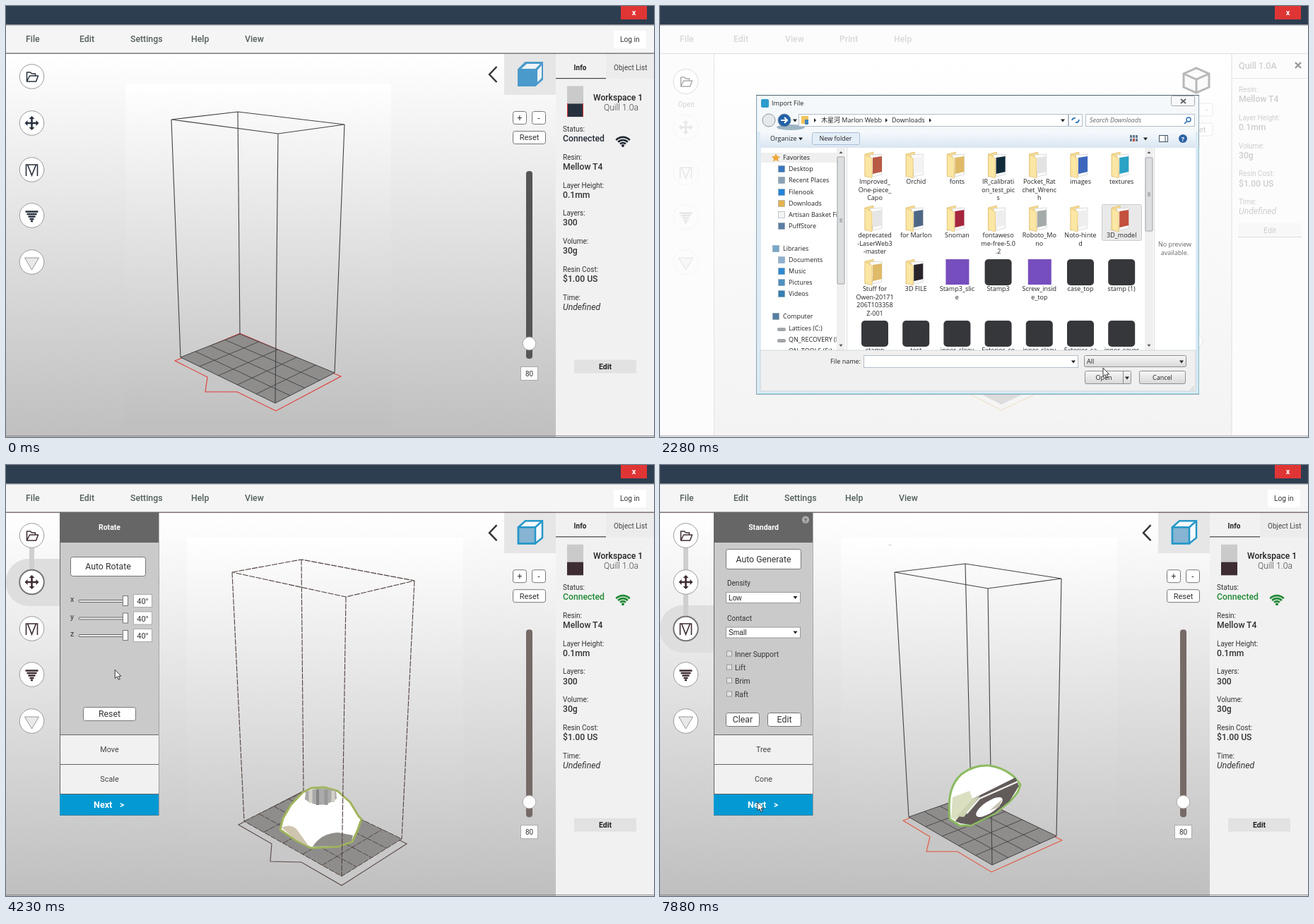
Write an HTML page that moves like this. It is 917 by 611 pixels and loops after 8000 ms.

```html
<!DOCTYPE html>
<html lang="en">
<head>
<meta charset="utf-8">
<title>Print preparation</title>
<style>
html, body { margin: 0; width: 100%; height: 100%; overflow: hidden; background: #fff }
svg { display: block; width: 917px; height: 611px; font-family: Roboto, sans-serif }
.dlg { font-family: "Open Sans", "Noto Sans", "Noto Sans CJK SC", sans-serif }
.form { font-family: "Liberation Sans", Arial, sans-serif }
</style>
</head>
<body>
<svg id="stage" viewBox="0 0 917 611"></svg>
<script>
const rect = (x, y, w, h, fill, more = '') =>
  `<rect x="${x}" y="${y}" width="${w}" height="${h}" fill="${fill}" ${more}/>`;
const text = (x, y, s, size = 10, fill = '#333', more = '') =>
  `<text x="${x}" y="${y}" font-size="${size}" fill="${fill}" ${more}>${s}</text>`;
const path = (d, stroke = '#333', width = 1, fill = 'none', more = '') =>
  `<path d="${d}" stroke="${stroke}" stroke-width="${width}" fill="${fill}" ${more}/>`;
const circle = (x, y, r, fill, stroke = 'none', width = 1) =>
  `<circle cx="${x}" cy="${y}" r="${r}" fill="${fill}" stroke="${stroke}" stroke-width="${width}"/>`;
const group = (s, more) => `<g ${more}>${s}</g>`;
const at = (x, y, s, more = '') => group(s, `transform="translate(${x} ${y})" ${more}`);
const mid = 'text-anchor="middle"', medium = 'font-weight="500"', bold = 'font-weight="700"';
const midBold = `${mid} ${bold}`;
const button = (x, y, w, h, label, size = 12.3) =>
  rect(x + .5, y + .5, w - 1, h - 1, '#fff', 'rx="3" stroke="#777"') +
  text(x + w / 2, y + h / 2 + size * .36, label, size, '#333', mid);
const down = (x, y, r = 3, fill = '#222') => path(`M${x - r} ${y - r / 2}h${2 * r}l${-r} ${r * 1.3}z`, 'none', 0, fill);

// Tool icons, centred on 0,0
const tools = ink => [
  path('M-7 7V-6H-2L0-4H5V-1M-7 7L-3-1H9L6 7Z', ink, 1.5, 'none', 'stroke-linejoin="round"'),
  path('M-7 0H7M0-7V7', ink, 2.6) +
    path('M0-10l4 4h-8zM0 10l4-4h-8zM-10 0l4-4v8zM10 0l-4-4v8z', 'none', 0, ink),
  path('M-8 9V-7H8V9M-6-7L0 8 6-7', ink, 1.6),
  path('M-9-5.500H9M-7-2H7M-5 1.500H5M-3 5H3M-1.500 8H1.500', ink, 2.4),
  path('M-10-6H10L0 11Z', '#999', 1, '#e9e9e9')
];
const toolY = [100, 166, 232, 297, 363];

function toolbar(ink, active) {
  let s = '';
  if (active >= 0) s += rect(0, toolY[active] - 33, 217, 67, '#dedede', 'rx="32"');
  if (active > 0) s += rect(33, 110, 7, toolY[active] - 110, '#cfcfcf');
  tools(ink).forEach((icon, i) => {
    const on = i === active && i;
    s += circle(36.5, toolY[i], 17.3, '#fff', on ? '#777' : '#999', on ? 2 : 1) + at(36.5, toolY[i], icon);
  });
  return s;
}

const titleBar = rect(0, 0, 917, 27, '#2d3e50') + rect(0, 26, 917, 1.5, '#8b9096') +
  rect(870, 0, 37, 19, '#e03535') + text(888.5, 13, 'x', 11, '#fff', midBold);
const menu = (names, xs, fill) => names.map((n, i) => text(xs[i], 50.7, n, 12.3, fill, medium)).join('');

function details(x, y, step, rows, fill, accent = fill) {
  return rows.map(([k, v], i) => {
    const style = v === 'Undefined' ? 'font-style="italic"' : medium;
    return text(x, y + i * step, k + ':', 10, fill) +
      text(x, y + i * step + 14.2, v, 12.2, v === 'Connected' ? accent : fill, style);
  }).join('');
}
const specs = [['Resin', 'Mellow T4'], ['Layer Height', '0.1mm'], ['Layers', 300], ['Volume', '30g'],
  ['Resin Cost', '$1.00 US'], ['Time', 'Undefined']];

const solidCube = path('M725 90L735 80H759V104L749 113H725Z', '#4a9acb', 2, '#4a9acb') +
  path('M729 89L737 82H756L749 89ZM752 91L758 84V102L752 108Z', 'none', 0, '#eef3f6');
const openCube = path('M725 89L735 80H759V104L749 112H725Z', '#2597c9', 2.5, '#f6fafc') +
  path('M725 89H749V112H725ZM749 89L759 80', '#2597c9', 2.5, '#86b4d2');

const controls = track =>
  path('M694.500 86L684 97 694.500 108', '#333', 2.4) +
  button(717, 149, 20, 19, '+', 12) + button(744, 149, 20, 19, '-', 12) + button(717, 177, 47, 19, 'Reset', 11) +
  rect(736, 234, 9, 266, track, 'rx="4"') + circle(740.5, 478.5, 9.3, '#fff', '#aaa') +
  rect(728.5, 511.5, 24, 19, '#fff', 'stroke="#aaa"') + text(740.5, 524.5, 80, 10, '#333', mid);

const infoPanel = (ink, signal, edges) =>
  rect(778, 68, 139, 542, '#f1f1f1') + rect(849, 68, 68, 35, '#ececec') + rect(778, 102, 71, 1.2, '#444') +
  text(812.5, 90.5, 'Info', 10, '#222', midBold) + text(860, 90.5, 'Object List', 10, '#444') +
  rect(794, 113.5, 23, 44, '#cacaca') + rect(794, 138.5, 23, 18.5, ink) + edges +
  text(831, 134, 'Workspace 1', 12.1, '#222', medium) +
  text(895, 148, 'Quill 1.0a', 12.2, '#444', 'text-anchor="end" font-weight="300"') +
  group(details(788, 178, 39.75, [['Status', 'Connected'], ...specs], '#333', signal), 'class="info"') +
  [5.5, 9.5, 13.5].map(r => path(`M${873 - r * .72} ${199.5 - r * .7}A${r} ${r} 0 0 1 ${873 + r * .72} ${199.5 - r * .7}`, signal, 2.6)).join('') +
  circle(873, 198, 2, signal) +
  rect(804, 501.5, 88, 19, '#e2e2e2') + text(848, 514.5, 'Edit', 10.5, '#222', midBold);

const dark = { ink: '#27303d', track: '#555', signal: '#222a33', line: '#666', cube: solidCube, shift: 0,
  edges: path('M794.500 138V157M816.500 138V157', '#d33') };
const brown = { ink: '#3d2c31', track: '#766a67', signal: '#218a37', line: '#6d5d5e', cube: openCube, shift: -.8, edges: '' };

const shell = (look, active, panels, view) =>
  rect(0, 0, 917, 611, '#f5f5f5') + titleBar +
  menu(['File', 'Edit', 'Settings', 'Help', 'View'], [28, 104, 176, 262, 338], '#53605a') +
  rect(860, 35, 46, 25, '#fff') + text(869, 51.2, 'Log in', 10.2) +
  rect(0, 68, 778, 543, 'url(#sky)') +
  panels.map(([x, y, w, h]) => rect(x, y, w, h, 'url(#sky)')).join('') + view + toolbar(look.ink, active) +
  at(0, look.shift, rect(705, 67, 73, 59, '#e6e6e6') + look.cube + controls(look.track) + infoPanel(look.ink, look.signal, look.edges)) +
  rect(0, 66.5, 917, 1.3, look.line) + rect(0, 609, 917, 1, '#888');

// Build volume; corners run left, back, right, front
function volume(top, base, plate, o, model = '') {
  const mix = (a, b, k) => a.map((v, i) => v + (b[i] - v) * k);
  const [l, b, r, f] = base;
  let grid = '';
  for (let i = 1; i < 5; i++) grid += `M${mix(l, f, i / 5)}L${mix(b, r, i / 5)}`;
  for (let i = 1; i < 4; i++) grid += `M${mix(l, b, i / 4)}L${mix(f, r, i / 4)}`;
  const dash = o.dash ? 'stroke-dasharray="8 1.500"' : '';
  const post = i => `M${top[i]}L${base[i]}`;
  return path(`M${plate.join('L')}Z`, o.edge, 1.1, o.fill) +
    path(`M${base.join('L')}Z`, o.line, 1, '#8e8d8c', dash) + path(grid, o.line, .9, 'none', dash) +
    path(post(1), o.line, 1.1, 'none', dash) + (o.over ? '' : model) +
    path(`M${top.join('L')}Z` + post(0) + post(2) + post(3), o.line, 1.1, 'none', dash) + (o.over ? model : '');
}

const dome =
  path('M388 517L392 501 403 482 420 464 432 458 450 457 469 462 487 478 499 498 503 502 497 519 490 534 470 541 432 543 410 532Z',
    '#a0b45b', 3, '#fff', 'stroke-linejoin="round"') +
  path('M424 463Q445 455 467 462L468 473Q445 490 423 474Z', 'none', 0, '#aaa') +
  path('M431 461V479M463 462V478', '#d3d0c8', 5) + path('M441 460V482', '#858585', 4) + path('M453 460V482', '#999', 5) +
  path('M390 514Q402 508 411 516L429 541 410 531Z', 'none', 0, '#cfc4ae') +
  path('M434 541Q446 522 470 521L491 525 489 533 470 540Z', 'none', 0, '#908e89');
const tilted =
  path('M410 502C407 470 412 451 427 438Q444 425 465 426 484 428 500 441L510 453Q508 465 495 477L474 494 440 511H424Z',
    '#8cbb60', 3, '#fff', 'stroke-linejoin="round"') +
  path('M414 471L438 462 443 475 421 505 412 500Z', 'none', 0, '#dadfc2') +
  path('M418 505L443 473 503 443 508 455 495 476 474 493 440 510 425 508Z', 'none', 0, '#625b59') +
  path('M420 498L443 473 453 469 430 499Z', 'none', 0, '#cdd2b2') +
  path('M434 494L452 473 506 449', '#f2f2ef', 2.4) +
  '<ellipse cx="466" cy="485" rx="22" ry="8" transform="rotate(-34 466 485)" fill="#fff"/>' +
  path('M466 490L484 474 480 485Z', 'none', 0, '#c8c4b5');

const emptyView = volume([[234, 161], [328, 150], [479, 168], [385, 181]],
  [[247, 498], [331, 465], [465, 520], [381, 563]],
  [[239, 503], [285, 526], [282, 547], [327, 547], [382, 574], [474, 525], [331, 464]],
  { line: '#424345', edge: '#e23a35', fill: '#c6c6c6' });
const domeView = volume([[320, 152], [418, 134], [578, 164], [481, 187]],
  [[337, 505], [421, 463], [560, 530], [475, 583]],
  [[329, 510], [376, 537], [374, 562], [418, 563], [475, 596], [567, 537], [421, 462]],
  { line: '#50413f', edge: '#5a4a48', fill: '#c8c8c8', dash: true }, dome);
const tiltedView = volume([[332, 152], [432, 140], [568, 161], [464, 175]],
  [[352, 499], [440, 468], [561, 526], [470, 567]],
  [[344, 504], [382, 527], [377, 548], [421, 548], [469, 577], [569, 532], [440, 467]],
  { line: '#454343', edge: '#e4553f', fill: '#c6c6c6', over: true }, tilted) +
  text(323, 114, '..', 9, '#777');

const next = y => rect(76, y, 140, 29.5, '#0499d3') + text(124, y + 19, 'Next', 12.6, '#fff', bold) +
  text(161, y + 19, '&gt;', 12, '#fff', bold);
const importPane = rect(76, 67, 139, 135, '#c9c9c9') + button(92, 86, 107, 28, 'Import') + next(202);

const accordion = (title, a, b, body) => rect(76, 67, 140.5, 430, '#666') +
  text(146.5, 91.5, title, 10.5, '#fff', midBold) + rect(77, 110, 139, 272, '#cacaca') +
  rect(77, 383, 139, 41, '#f1f1f1') + rect(77, 425, 139, 41, '#f1f1f1') +
  text(146.5, 406.5, a, 10.8, '#444', mid) + text(146.5, 449, b, 10.8, '#444', mid) + next(467) + body;

const rotatePane = accordion('Rotate', 'Move', 'Scale', button(91, 130, 107, 28, 'Auto Rotate') +
  ['x', 'y', 'z'].map((n, i) => at(0, i * 24.5,
    text(91, 194, n, 10.5) + rect(103, 191.5, 66, 3, '#eee', 'stroke="#666" rx="1"') +
    rect(165.5, 185.5, 7, 14, '#fff', 'stroke="#777"') + rect(180.5, 183.5, 26, 18, '#fff', 'stroke="#aaa"') +
    text(193.5, 197, '40°', 11, '#333', mid))).join('') + button(109, 343, 75, 20, 'Reset'));

const select = (y, label, value) => text(95, y - 9, label, 10) +
  rect(93.5, y + .5, 105, 15, '#fff', 'stroke="#999"') + text(97, y + 11.5, value, 10.2, '#222', 'class="form"') + down(191.5, y + 7.5);
const supportPane = accordion('Standard', 'Tree', 'Cone', circle(206, 77.5, 5.2, '#aaa') +
  text(206, 80.5, '?', 8, '#555', midBold) + button(93, 119, 107, 29, 'Auto Generate') +
  select(180, 'Density', 'Low') + select(229.5, 'Contact', 'Small') +
  ['Inner Support', 'Lift', 'Brim', 'Raft'].map((n, i) =>
    rect(94.5, 264 + 19 * i, 7, 7, '#e3e3e3', 'stroke="#999"') + text(106, 272 + 19 * i, n, 10.3)).join('') +
  button(93, 351, 48, 20, 'Clear') + button(152, 351, 48, 20, 'Edit'));

// File dialog
const label = (x, y, s, more = '', fill = '#222') => text(x, y + 3, s, 9, fill, more);
const field = (x, y, w, h, fill = '#fff') => rect(x + .5, y + .5, w - 1, h - 1, fill, 'stroke="#b4bec8"');
const glass = (x, y, w, h) => rect(x + .5, y + .5, w - 1, h - 1, 'url(#key)', 'stroke="#8e8f92" rx="2"');

const folder = tone => path('M-14-15L-2-18V14L-14 17Z', '#d9b35c', .6, '#f6dc92') +
  path('M-7-14L10-15V14L-3 17Z', '#bbb', .5, '#fbfbfb') + path('M-3-10L10-12V10L-3 13Z', 'none', 0, tone) +
  path('M-14-15L-4-9V19L-14 16Z', '#dcb65e', .6, '#fbe6a4');
const model = rect(-19, -18, 38, 37, '#35373a', 'rx="5"');
const purple = rect(-16, -18, 33, 36, '#774ebd');

const files = [
  ['Improved_|One-piece_|Capo', '#b85a45'], ['Orchid', '#f3f3f3'], ['fonts', '#dfba68'], ['IR_calibrati|on_test_pic|s', '#122b3b'],
  ['Pocket_Rat|chet_Wrenc|h', '#e3e3e3'], ['images', '#3d67bc'], ['textures', '#2ba2c6'],
  ['deprecated|-LaserWeb3|-master', '#e6e6e6'], ['for Marlon', '#4e6785'], ['Snoman', '#a5263d'], ['fontaweso|me-free-5.0|.2', '#eee'],
  ['Roboto_Mo|no', '#a4aaa9'], ['Noto-hinte|d', '#eee'], ['3D_model', '#c4503e'],
  ['Stuff for|Owen-20171|206T103358|Z-001', '#dfba68'], ['3D FILE', '#29242a'], ['Stamp3_slic|e', purple], ['Stamp3', model],
  ['Screw_insid|e_top', purple], ['case_top', model], ['stamp (1)', model],
  ...['stamp', 'test', 'inner_sleev', 'Exterior_co', 'inner_sleev', 'Exterior_ca', 'inner_cover'].map(n => [n, model])
].map(([name, icon], i) => {
  const x = 304 + 58.2 * (i % 7), y = [225, 301, 377, 464][i / 7 | 0];
  return at(x, y, (icon[0] === '#' ? folder(icon) : icon) +
    name.split('|').map((s, j) => label(0, 24 + 11.5 * j, s, mid)).join(''));
}).join('');

const places = [['Favorites', 215, '#f0a83a'], ['Desktop', 231, '#3977bd', 1], ['Recent Places', 247, '#8aa2b5', 1],
  ['Filenook', 264, '#2484d6', 1], ['Downloads', 280, '#e2b44f', 1], ['Artisan Basket Fi', 296, '#f4f4f4', 1],
  ['PuffStore', 312, '#5c7ea4', 1], ['Libraries', 344, '#79a8c9'], ['Documents', 360, '#8db1cf', 1], ['Music', 376, '#3289d1', 1],
  ['Pictures', 392, '#4e91bd', 1], ['Videos', 408, '#347fb2', 1], ['Computer', 440, '#567e9e'], ['Lattices (C:)', 457, '#a3a6a9', 1],
  ['QN_RECOVERY (D', 473, '#a3a6a9', 1], ['QN_TOOLS (E:)', 489, '#a3a6a9', 1]
].map(([n, y, c, sub]) => {
  const x = sub ? 172 : 164;
  const icon = n === 'Favorites' ? path(`M164 ${y - 6}l2 4 4 .500-3 3 1 4-4-2-4 2 1-4-3-3 4-.500z`, 'none', 0, c)
    : c === '#a3a6a9' ? rect(x - 6, y - 1, 12, 5, c, 'rx="2"') : rect(x - 4.5, y - 4.5, 9, 9, c, 'stroke="#8899a8" stroke-width=".5"');
  return icon + label(x + 10, y, n);
}).join('');

const scrollbar = (x, top, h) => rect(x, 201, 12, 287, '#f0f0f0') + rect(x + 1, top, 10, h, '#dcdee0', 'stroke="#a0a4a8" rx="1"') +
  path(`M${x + 3.5} 209l2.500-3 2.500 3z`, 'none', 0, '#555') + down(x + 6, 481, 2.5, '#555') +
  path(`M${x + 4} ${top + h / 2 - 2}h4m-4 2h4m-4 2h4`, '#777', .8);
const arrow = x => path(`M${x} 159l3 3-3 3z`, 'none', 0, '#222');

const dialog = group(
  rect(136.5, 126.5, 626, 424, '#dcebf5', 'stroke="#8fa5b1"') + rect(138, 128, 624, 50, '#f4f8fb') +
  path('M136 126.500H763', '#5b6a74') + path('M138 549.500H762V200', '#9fdbe9') +
  rect(143, 132, 11, 12, '#2c9dcc', 'rx="2"') + label(158, 138, 'Import File') +
  rect(723.5, 127.5, 33, 14, '#f7f8f9', 'stroke="#aaa" rx="2"') + path('M737 132l7 6m0-6l-7 6', '#666', 2) +
  '<ellipse cx="185" cy="172" rx="20" ry="4" fill="#9eb5c3"/>' +
  circle(154, 162, 9, '#e5e9ec', '#8f979d') + circle(176, 162, 9, '#2261a8', '#7990a5') +
  path('M171 162h9m-4-4l4 4-4 4', '#fff', 2.2) + down(191, 162) +
  field(196, 153, 382, 18) + rect(200, 156, 10, 11, '#eec45d') + rect(205, 161, 5, 7, '#3d83bd') +
  arrow(218) + label(228, 162, '木星河 Marlon Webb') + arrow(319) + label(328, 162, 'Downloads') + arrow(381) +
  down(570, 162) + field(578, 153, 20, 18) + path('M583 162q1-4 5-3m0 6q4 1 5-4', '#2d75bd', 1.8) +
  field(602, 153, 155, 18) + label(608, 162, 'Search Downloads', 'font-style="italic"', '#666') +
  circle(748, 161, 3, 'none', '#2a6fb5', 1.4) + path('M746 163l-4 4', '#2a6fb5', 1.6) +
  rect(142, 177, 616, 24, 'url(#bar)') + label(156, 188, 'Organize') + down(199, 188) +
  rect(215.5, 179.5, 67, 17, '#e4eef8', 'stroke="#a9bed2" rx="2"') + label(248.5, 188, 'New folder', mid) +
  [0, 4, 8].map(x => rect(665 + x, 183, 3, 4, '#667b8f') + rect(665 + x, 188, 3, 4, x === 4 ? '#b9533e' : '#667b8f')).join('') +
  down(687, 188) + rect(706.5, 183.5, 12, 9, '#fff', 'stroke="#456"') + path('M715 184v9', '#456') +
  circle(740, 188, 6, '#2d62a5') + text(740, 191.5, '?', 9, '#fff', midBold) +
  rect(143, 201, 615, 287, '#fff') +
  group(rect(143, 208, 107, 14, '#efefef') + places, 'clip-path="url(#nav)"') +
  scrollbar(250, 214, 180) + rect(264, 201, 1, 287, '#ddd') +
  group(rect(625.5, 281.5, 56, 51, '#e9e9e9', 'stroke="#ccc" rx="2"') + files, 'clip-path="url(#list)"') +
  scrollbar(686, 215, 104) + rect(699, 201, 1, 287, '#ddd') +
  label(728.5, 338, 'No preview', mid, '#666') + label(728.5, 349.500, 'available.', mid, '#666') +
  rect(142, 488, 616, 58, '#f0f0f0', 'stroke="#b6c3cc" stroke-width=".6"') +
  label(284, 504, 'File name:', 'text-anchor="end"') + field(288, 495, 304, 18) + down(585, 504) +
  glass(600, 495, 145, 17) + label(604, 504, 'All') + down(738, 504) +
  glass(601, 517, 66, 19) + path('M655.500 518v17', '#8e8f92') + label(628, 526.5, 'Open', mid) + down(661, 527) +
  glass(678, 517, 66, 19) + label(711, 526.5, 'Cancel', mid) +
  path('M756 539l-6 6m6-3l-3 3', '#bbb'), 'class="dlg"');

const faded = rect(0, 27, 917, 584, '#fcfcfc') + rect(77, 68, 732, 541, 'url(#pale)') + titleBar +
  menu(['File', 'Edit', 'View', 'Print', 'Help'], [28, 104, 177, 254, 331], '#d8d8d8') +
  rect(0, 67, 917, 1, '#ddd') + rect(76, 68, 1, 541, '#e4e4e4') +
  tools('#aaa').map((icon, i) => at(36.5, [107, 172, 236, 299, 363][i], circle(0, 0, 17.5, '#fff', '#ddd') + icon,
    `opacity="${i ? .25 : 1}"`)).join('') + text(37, 142.5, 'Open', 10, '#d3d3d3', mid) +
  path('M440 551L483 573 530 551', '#f0ddc0') + path('M450 548L483 565 518 548Z', 'none', 0, '#ddd') +
  path('M759 88L777 96V115L759 123 741 115V96ZM741 96L759 104 777 96M759 104V123', '#b8b8b8', 3, '#fafafa') +
  rect(745, 138, 37, 18, '#fff', 'rx="3" stroke="#eaeaea"') + text(772, 151, '-', 11, '#ccc') +
  rect(735, 166, 47, 18, '#fff', 'rx="3" stroke="#eaeaea"') + text(758.5, 179, 'Reset', 11, '#ccc', mid) +
  circle(758, 475, 10, '#fff', '#e4e4e4') +
  rect(809, 68, 108, 541, '#fcfcfc') + rect(808.5, 68, 1, 541, '#ddd') +
  text(819, 89, 'Quill 1.0A', 12.6, '#c6c6c6') + path('M899 80l8 8m0-8l-8 8', '#999', 2.4) + rect(809, 102, 108, 1, '#e5e5e5') +
  details(819, 122, 39.8, specs.filter(([k]) => k !== 'Layers'), '#cecece') +
  rect(818, 308, 90, 19, '#f8f8f8') + rect(818, 327, 90, 1, '#ddd') + text(863, 321.5, 'Edit', 10.5, '#cecece', mid) +
  rect(0, 609, 917, 1, '#aaa') + dialog;

const wide = [256, 103, 391, 507];
const scenes = [
  [0, shell(dark, -1, [[169, 110, 376, 486]], emptyView)],
  [1170, faded],
  [2520, shell(brown, 0, [wide], domeView) + importPane],
  [3750, shell(brown, 1, [wide], domeView) + rotatePane],
  [6570, shell(brown, 2, [wide, [272, 106, 349, 504]], tiltedView) + supportPane]
];

const gradient = (id, a, b) => `<linearGradient id="${id}" x2="0" y2="1"><stop stop-color="${a}"/><stop offset="1" stop-color="${b}"/></linearGradient>`;
const clip = (id, x, w) => `<clipPath id="${id}">${rect(x, 201, w, 287, '#000')}</clipPath>`;
document.getElementById('stage').innerHTML = '<defs>' + gradient('sky', '#fff', '#bfbfbf') + gradient('pale', '#fff', '#f3f3f3') +
  gradient('bar', '#f7fafd', '#d9e6f2') + gradient('key', '#f6f6f6', '#d9d9d9') + clip('nav', 143, 107) + clip('list', 265, 421) + '</defs>' +
  scenes.map(s => group(s[1], 'class="scene"')).join('') +
  group(circle(36.5, 100, 17.3, 'none', '#777', 2), 'id="hover"') +
  group(rect(0, 600, 212, 11, '#fff') + path('M0 599.500H212.500V611', '#bbb'), 'id="status"') +
  group(path('M0 0V12L3 9.500 5 14 7 13 5 9H8.500Z', '#222', .9, '#fff'), 'id="arrow"') +
  group(path('M3.500 9V1.500Q5 0 6 1.500V6L10 7Q11.500 7 11.500 9V12L10 15.500H5L1 10Q1 8 3.500 10Z', '#222', .9, '#fff') +
    path('M8 7v3M10 7.500v3', '#222', .7), 'id="hand"');

// Time, x, y and shape in use from that time on
const track = [
  [150, 110, 117, 'arrow'], [930, 34, 100, 'arrow'], [1020, 34, 100, 'hand'],
  [1170, 108, 156, 'hand'], [1240, 125, 175, 'arrow'], [1960, 659, 520, 'arrow'], [2280, 627, 513, 'arrow'], [2519, 627, 513, 'arrow'],
  [2520, 440, 381, 'arrow'], [2600, 440, 381, 'arrow'], [3600, 115, 217, 'arrow'], [3750, 115, 217, 'arrow'], [4150, 102, 232, 'arrow'],
  [4550, 360, 520, 'arrow'], [5000, 801, 480, 'arrow'], [5080, 822, 444, 'arrow'], [5230, 787, 329, 'arrow'], [5610, 780, 332, 'arrow'],
  [6200, 72, 495, 'arrow'], [6390, 120, 480, 'hand'], [6650, 120, 480, 'hand'], [6800, 136, 499, 'arrow'], [7360, 136, 517, 'arrow'],
  [7560, 131, 490, 'hand'], [7720, 131, 471, 'hand'], [7879, 131, 471, 'hand'], [7880, 138, 478, 'arrow'], [8000, 138, 478, 'arrow']
];
const groups = [...document.querySelectorAll('.scene')];
const infos = [...document.querySelectorAll('.info')];
const show = (el, on) => { el.style.display = on ? '' : 'none'; };
const byId = id => document.getElementById(id);

function draw(t) {
  const current = scenes.findLastIndex(s => t >= s[0]);
  groups.forEach((g, i) => show(g, i === current));
  infos[1].setAttribute('transform', `translate(0 ${t < 2600 ? 6.8 : 0})`);
  show(byId('hover'), t > 850 && t < 1170);
  show(byId('status'), t >= 1170 && t < 1500 || t >= 6570 && t < 6900);
  const i = track.findLastIndex(k => t >= k[0]);
  const a = track[i], b = track[i + 1];
  for (const id of ['arrow', 'hand']) show(byId(id), a && a[3] === id);
  if (a) {
    const k = (t - a[0]) / (b[0] - a[0]);
    byId(a[3]).setAttribute('transform', `translate(${a[1] + (b[1] - a[1]) * k} ${a[2] + (b[2] - a[2]) * k})`);
  }
}
const start = performance.now();
function tick() {
  draw((performance.now() - start) % 8000);
  requestAnimationFrame(tick);
}
tick();
</script>
</body>
</html>
```
